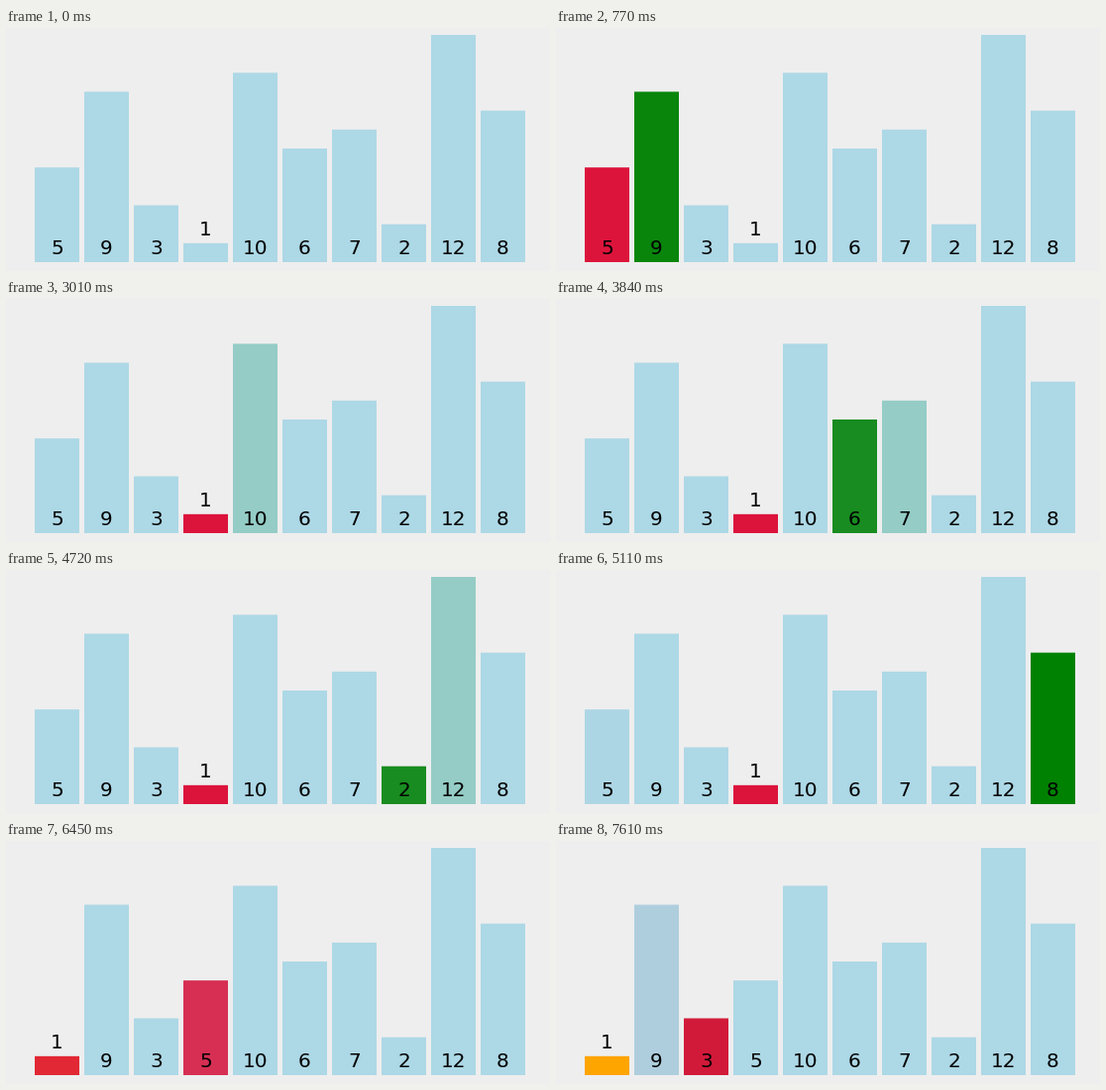
These frames come from a looping animation (549x246 px, 8 s). A matplotlib script:

```python
import numpy as np
import matplotlib.pyplot as plt
from matplotlib.animation import FuncAnimation
from matplotlib.colors import to_rgb
from matplotlib.patches import Rectangle

W, H, DPI = 549, 246, 100
LOOP, STEP = 8000, 20
VALUES = [5, 9, 3, 1, 10, 6, 7, 2, 12, 8]
LEFT, PITCH, BAR_W, BASE = 29, 50, 45, 237
UNIT = 230 / max(VALUES)

# Motion comes in bursts of a few ticks, each covering about two sort steps.
FIRST, PERIOD, TICK = 450, 850, 75
OFFSET, RATE = 0.325, 0.36

IDLE, LEAST, SCAN, DONE = (
    np.array(to_rgb(c)) for c in ("lightblue", "crimson", "green", "orange"))


def selection_sort(values):
    """Yield (new colours, new slots) by bar for each step of the sort."""
    order = list(range(len(values)))
    for i in range(len(order)):
        least = order[i]
        yield {least: LEAST}, {}
        last = {}
        for bar in order[i + 1:]:
            yield {**last, bar: SCAN}, {}
            last = {bar: IDLE}
            if values[bar] < values[least]:
                yield {least: IDLE, bar: LEAST}, {}
                least, last = bar, {}
        head, j = order[i], order.index(least)
        yield {**last, head: LEAST}, {}
        order[i], order[j] = least, head
        yield {}, {head: j, least: i}
        yield {head: IDLE, least: DONE}, {}


STEPS = list(selection_sort(VALUES))


def ease(t):
    t = min(max(t, 0), 1)
    return 4 * t**3 if t < 0.5 else 1 - 4 * (1 - t)**3


def position(ms):
    burst, t = divmod(ms - FIRST, PERIOD)
    if burst < 0:
        return 0
    ticks = 4 if burst % 6 == 2 else 5
    return 2 * burst + OFFSET + RATE * min(t // TICK, ticks)


def state(pos):
    cols = [IDLE] * len(VALUES)
    slots = list(range(len(VALUES)))
    for k, changes in enumerate(STEPS[:int(pos) + 1]):
        f = ease(pos - k)
        for now, new in zip((cols, slots), changes):
            for i, goal in new.items():
                now[i] = now[i] + (goal - now[i]) * f
    return cols, slots


fig = plt.figure(figsize=(W / DPI, H / DPI), dpi=DPI, facecolor="#eeeeee")
ax = fig.add_axes([0, 0, 1, 1])
ax.set(xlim=(0, W), ylim=(H, 0))
ax.axis("off")

bars, labels = [], []
for i, v in enumerate(VALUES):
    x, h = LEFT + PITCH * i, UNIT * v
    bar = Rectangle((x, BASE - h), BAR_W, h, lw=0, snap=False, zorder=1 + i)
    bars.append(ax.add_patch(bar))
    labels.append(ax.text(
        x + BAR_W / 2, 229 if v > 1 else 210, str(v), ha="center",
        va="baseline", family="DejaVu Sans", size=20 * 72 / DPI,
        color="black", zorder=20))


def draw(frame):
    cols, slots = state(position(frame * STEP + STEP / 2))
    for bar, label, col, slot in zip(bars, labels, cols, slots):
        x = LEFT + PITCH * slot
        bar.set_x(x)
        bar.set_facecolor(np.clip(col, 0, 1))
        label.set_x(x + BAR_W / 2)
    return bars + labels


anim = FuncAnimation(fig, draw, frames=LOOP // STEP, interval=STEP,
                     init_func=lambda: draw(0), repeat=True, repeat_delay=0)
plt.show()
```
